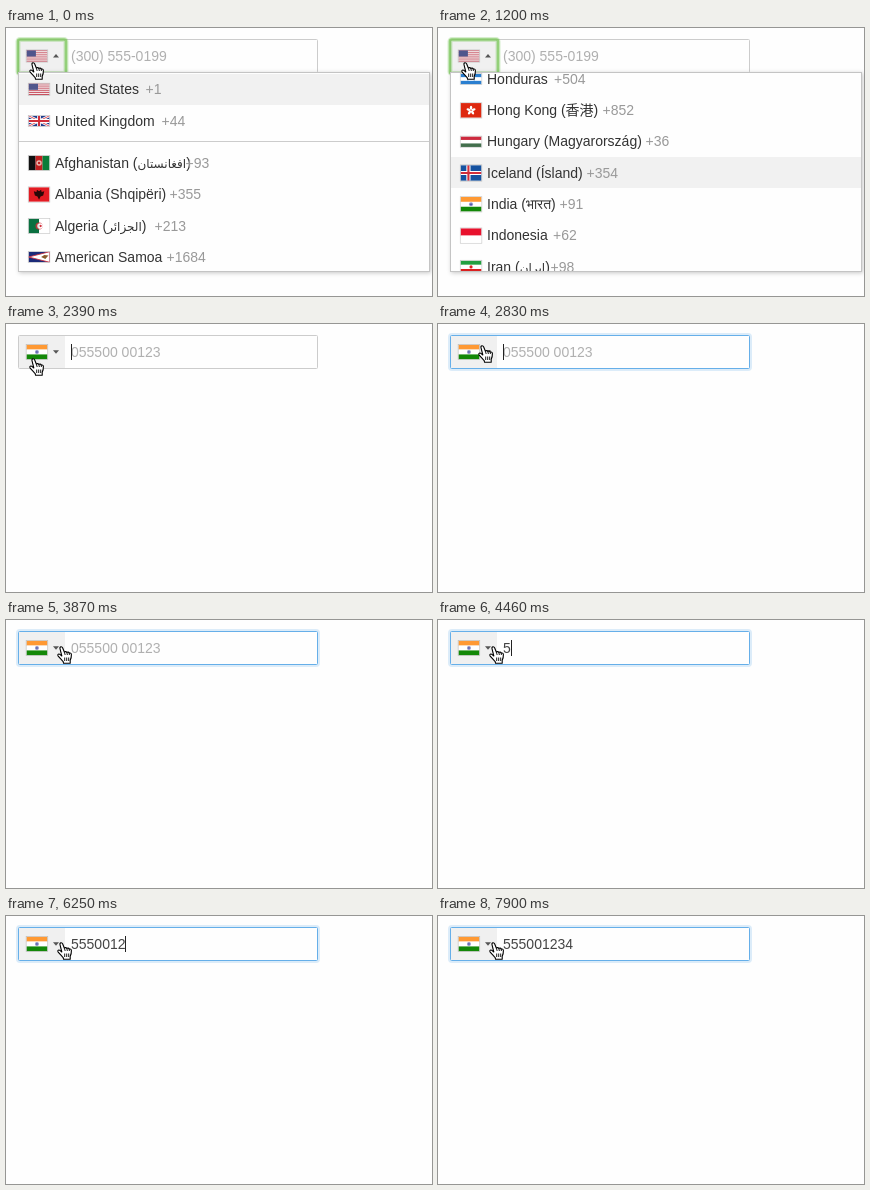
Recreate the animation shown at these times as an HTML page. Size 426 px wide and 268 px high, loop 8000 ms.

```html
<!DOCTYPE html>
<html lang="en">
<head>
<meta charset="utf-8">
<title>Phone input</title>
<style>
html, body { margin: 0; height: 100%; overflow: hidden; background: #fefefe; }
svg { display: block; }
#stage { width: 426px; height: 268px; }
text { font: 14px "Liberation Sans", "DejaVu Sans", "Noto Sans", "Noto Sans CJK SC", sans-serif; white-space: pre; }
.script { font-size: 12px; }
.list { filter: drop-shadow(1px 1px 2px rgba(0, 0, 0, .22)); }
</style>
</head>
<body>
<svg id="stage" viewBox="0 0 426 268"></svg>
<script>
const LOOP = 8000, ROW = 31.3, DIGIT = 7.786;

const rect = (x, y, w, h, fill, more = '') =>
  `<rect x="${x}" y="${y}" width="${w}" height="${h}" fill="${fill}" ${more}/>`;
const path = (d, fill, more = '') => `<path d="${d}" fill="${fill}" ${more}/>`;
const line = (d, color, width) => path(d, 'none', `stroke="${color}" stroke-width="${width}"`);
const dot = (x, y, r, fill) => `<circle cx="${x}" cy="${y}" r="${r}" fill="${fill}"/>`;
const text = (x, y, s, fill) => `<text x="${x}" y="${y}" fill="${fill}">${s}</text>`;

// Flags are drawn 20 units wide
const bars = (h, ...colors) =>
  colors.map((c, i) => rect(0, i * h / colors.length, 20, h / colors.length + .02, c)).join('');
const columns = (h, ...colors) =>
  colors.map((c, i) => rect(i * 20 / colors.length, 0, 20 / colors.length + .02, h, c)).join('');
const crosses = (d, ...strokes) => strokes.map(([c, w]) => line(d, c, w)).join('');

const RED = '#d22f3b', WHITE = '#fff', BLUE = '#1e3c8c';
const flags = {
  us: [11, bars(11, ...Array.from({ length: 11 }, (_, i) => i % 2 ? '#f3e8ea' : '#c8505f')) + rect(0, 0, 9, 6, '#50558c')],
  gb: [10, rect(0, 0, 20, 10, BLUE) + crosses('M0 0L20 10M20 0L0 10', [WHITE, 2.4], [RED, .8]) +
    crosses('M10 0V10M0 5H20', [WHITE, 3.6], [RED, 2])],
  af: [14, columns(14, '#111', '#c01f1f', '#0a7d38') + dot(10, 7, 2.6, '#e9b9b0') + dot(10, 7, 1.2, '#c01f1f')],
  al: [14, rect(0, 0, 20, 14, '#e31b23') +
    path('M10 4L8 2.5 7.5 4.5 5 4 6 8 8.5 9 10 12 11.5 9 14 8 15 4 12.5 4.5 12 2.5Z', '#2a0808')],
  dz: [14, columns(14, '#0a7040', WHITE) + dot(10, 7, 3.4, RED) + dot(11, 7, 2.7, WHITE) +
    rect(0, 3, 9.9, 8, '#0a7040', 'opacity=".15"') + dot(11.5, 7, 1.1, RED)],
  as: [10, rect(0, 0, 20, 10, '#1b2a78') + path('M0 5L20 0V10Z', WHITE, `stroke="${RED}" stroke-width=".8"`) +
    path('M12 5L15 3 19 3.5 16 7Z', '#8a5a2b')],
  hn: [10, bars(10, '#2a7fd0', WHITE, '#2a7fd0') + [[7, 4.2], [13, 4.2], [10, 5], [7, 5.8], [13, 5.8]]
    .map(([x, y]) => dot(x, y, .5, '#2a7fd0')).join('')],
  hk: [14, rect(0, 0, 20, 14, '#de2910') + [0, 1, 2, 3, 4].map(i =>
    `<ellipse cx="10" cy="4.5" rx="1.2" ry="2" fill="#fff" transform="rotate(${i * 72} 10 7)"/>`).join('')],
  hu: [10, bars(10, '#cd2a3e', WHITE, '#436f4d')],
  is: [15, rect(0, 0, 20, 15, '#1552a0') + crosses('M7.5 0V15M0 7.5H20', [WHITE, 4], [RED, 2])],
  in: [14, bars(14, '#ff9933', WHITE, '#138808') + dot(10, 7, 1.9, '#8f93c8') + dot(10, 7, .8, '#4348a0')],
  id: [14, bars(14, '#e8112d', WHITE)],
  ir: [12, bars(12, '#239f40', WHITE, '#da2020') + dot(10, 6, 1.5, '#da2020')]
};

function flag(code, x, cy) {
  const [h, art] = flags[code], scale = 1.044;
  return `<g transform="translate(${x} ${cy - h * scale / 2}) scale(${scale})">` +
    rect(-.3, -.3, 20.6, h + .6, 'none', 'stroke="#888" stroke-opacity=".45" stroke-width=".7"') +
    `<svg width="20" height="${h}">${art}</svg></g>`;
}

const script = s => `<tspan class="script">${s}</tspan>`;

// Row: flag, name, dial code, x of dial code, centre y
const topRows = [
  ['us', 'United States', '+1', 139.5, 61.3],
  ['gb', 'United Kingdom', '+44', 155.5, 93],
  ['af', `Afghanistan (${script('افغانستان')})`, '+93', 179.5, 135],
  ['al', 'Albania (Shqipëri)', '+355', 163.5, 166.5],
  ['dz', `Algeria (${script('الجزائر')})`, '+213', 148.5, 198],
  ['as', 'American Samoa', '+1684', 160.5, 229]
];
const scrolledRows = [
  ['hn', 'Honduras', '+504', 116],
  ['hk', 'Hong Kong (香港)', '+852', 164.5],
  ['hu', 'Hungary (Magyarország)', '+36', 207.5],
  ['is', 'Iceland (Ísland)', '+354', 148.5],
  ['in', 'India (भारत)', '+91', 121.5],
  ['id', 'Indonesia', '+62', 115],
  ['ir', `Iran (${script('ایران')})`, '+98', 112.5]
].map((row, i) => [...row, 51.1 + i * ROW]);

function dropdown(rows, active, divider) {
  const items = rows.map(([code, name, dial, dialX, cy], i) => {
    const base = Math.round(cy + 4.6);
    return (i === active ? rect(13, Math.round(cy - 15.6), 410, 31, '#f1f1f1') : '') +
      flag(code, 22.6, cy) + text(49, base, name, '#333') + text(dialX, base, dial, '#999');
  }).join('');
  return rect(12.5, 44.5, 411, 199, '#fefefe', 'stroke="#c4c4c4" class="list"') +
    `<svg x="13" y="45" width="410" height="198" viewBox="13 45 410 198">${items}` +
    (divider ? rect(13, 113, 410, 1, '#ccc') : '') + '</svg>';
}

const hand = (x, y) => `<g transform="translate(${x} ${y})">` +
  path('M3 2.6C2.4 .5 5 .2 5.7 2L7.4 6.3C8 5.2 9.6 5.4 9.9 6.6C10.6 5.7 12 6 12.2 7.2C13.2 6.6 14.4 7.2 14.4 8.6' +
    'C14.5 11 14 12.6 13.2 14.2V17.3H6.6L6.2 15.6C4.4 13.6 2.4 11.6 1 9.8C.2 8.4 1.8 7.4 3.2 8.6L4.8 10Z',
    '#fff', 'stroke="#000" stroke-width="1.1" stroke-linejoin="round"') +
  line('M7.4 6.3L8.2 9M9.9 6.6L10.4 9M12.2 7.2L12.4 9M7.7 11.5V15M9.7 11.5V15M11.7 11.5V15', '#000', .9) + '</g>';

const OPEN_UNTIL = 2390, FOCUS = 2540;
const keyTimes = [4460, 4910, 5210, 5360, 5810, 5960, 6250, 6400, 7450];
const caretOff = [[0, 2390], [2980, 3420], [3870, 4460], [7000, 7450], [7900, LOOP]];
const typed = '555001234';

function scene(t) {
  const open = t < OPEN_UNTIL, focused = t >= FOCUS;
  const count = keyTimes.filter(k => t >= k).length;
  const caret = !caretOff.some(([from, to]) => t >= from && t < to);
  const glow = (x, y, w, h, color, width, alpha) =>
    rect(x, y, w, h, 'none', `rx="2" stroke="${color}" stroke-width="${width}" stroke-opacity="${alpha}"`);

  let out = focused ? glow(12, 11, 300, 34, '#66afe9', 4, .22) : '';
  out += rect(12.5, 11.5, 299, 33, '#fefefe', `rx="1" stroke="${focused ? '#66afe9' : '#ccc'}"`);
  out += rect(13, 12, 46, 32, '#f0f0f0');
  if (open) out += glow(12, 11.5, 48, 34, '#7cc65c', 5, .3) + glow(12, 11.5, 48, 34, '#7cc65c', 2.6, .75);
  out += flag(open ? 'us' : 'in', 20.5, 28);
  out += path(open ? 'M47 29.5H53L50 26Z' : 'M47 26.3H53L50 29.8Z', '#555');
  out += count ? text(65, 33, typed.slice(0, count), '#444')
    : text(65, 33, open ? '(300) 555-0199' : '055500 00123', '#b0b0b0');
  if (caret) out += rect(Math.round(64.98 + DIGIT * count), 20, 1, 16, '#222');
  if (open) out += t < 1200 ? dropdown(topRows, 0, true) : dropdown(scrolledRows, t < 1340 ? 3 : 4);
  return out + (t < 2830 ? hand(23, 34) : t < 2980 ? hand(40, 21) : hand(51, 26));
}

const stage = document.getElementById('stage');
let shown = '';
function draw() {
  const markup = scene(performance.now() % LOOP);
  if (markup !== shown) stage.innerHTML = shown = markup;
  requestAnimationFrame(draw);
}
draw();
</script>
</body>
</html>
```
